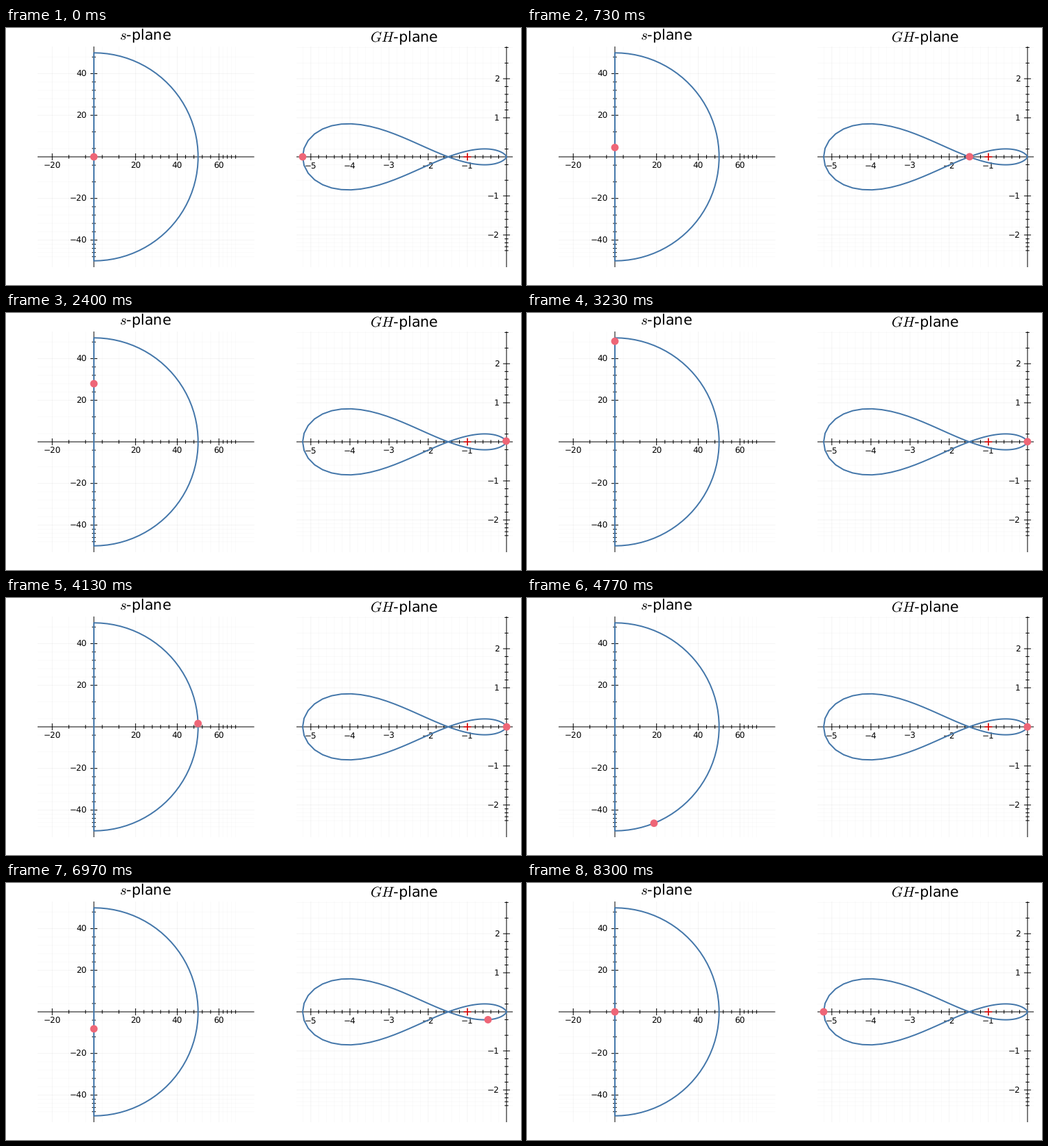
Recreate the animation shown at these times as a matplotlib script. Size 750x375 px, loop 8330 ms.

```python
import numpy as np
import matplotlib.pyplot as plt
from matplotlib.animation import FuncAnimation
from matplotlib.patches import Circle

W, H, DPI = 750, 375, 100
PX = 72 / DPI  # points per pixel
BLUE, PINK = "#4477AA", "#EE6677"
MAJOR, MINOR = 5, 2.75
TOP, BOTTOM = 27, 349
N = 50  # steps per leg of the contour
LOOP = 8330

plt.rcParams.update({
    "font.family": "DejaVu Sans",
    "mathtext.fontset": "cm",
    "path.simplify": False,
    "text.hinting": "none",
})

fig = plt.figure(figsize=(W / DPI, H / DPI), dpi=DPI, facecolor="white")
ax = fig.add_axes([0, 0, 1, 1])
ax.set_xlim(0, W)
ax.set_ylim(H, 0)
ax.axis("off")


def minor_ticks(ticks, lo, hi):
    """Split each interval in five, with one phantom tick on either side."""
    t = np.array(ticks, float)
    ratio = (t[2] - t[1]) / (t[1] - t[0])
    t = np.r_[t[0] - (t[1] - t[0]) / ratio, t, t[-1] + (t[-1] - t[-2]) * ratio]
    m = np.concatenate([np.linspace(a, b, 6)[1:-1] for a, b in zip(t, t[1:])])
    return m[(m >= lo) & (m <= hi)]


class Plane:
    def __init__(self, origin, unit, left, right, xticks, yticks):
        self.ox, self.oy = origin
        self.unit, self.left, self.right = unit, left, right
        self.xticks, self.yticks = xticks, yticks
        self.draw_axes()

    def px(self, z):
        return self.ox + np.real(z) * self.unit, self.oy - np.imag(z) * self.unit

    def draw_axes(self):
        ox, oy, u = self.ox, self.oy, self.unit
        xminor = minor_ticks(self.xticks, (self.left - ox) / u, (self.right - ox) / u)
        yminor = minor_ticks(self.yticks, (oy - BOTTOM) / u, (oy - TOP) / u)
        line = dict(colors="black", lw=PX, snap=False)
        for xs, ys, size, alpha in ((xminor, yminor, MINOR, 0.02),
                                    (self.xticks, self.yticks, MAJOR, 0.045)):
            xs = ox + np.array(xs) * u
            ys = oy - np.array(ys) * u
            ax.vlines(xs, TOP, BOTTOM, alpha=alpha, zorder=1, **line)
            ax.hlines(ys, self.left, self.right, alpha=alpha, zorder=1, **line)
            ax.vlines(xs, oy - size, oy + size, zorder=2, **line)
            ax.hlines(ys, ox - size, ox + size, zorder=2, **line)
        ax.hlines(oy, self.left, self.right, zorder=2, **line)
        ax.vlines(ox, TOP, BOTTOM, zorder=2, **line)
        for v in self.xticks:
            self.label(ox + v * u, oy + 17, v, "center")
        for v in self.yticks:
            self.label(ox - 10.3, oy - v * u + 4.2, v, "right")

    def label(self, x, y, value, ha):
        ax.text(x, y, str(value).replace("-", "\u2212"), ha=ha, va="baseline",
                fontsize=12 * PX, zorder=3)

    def title(self, text, y):
        ax.text((self.left + self.right) / 2 - 0.8, y, text, ha="center",
                va="baseline", fontsize=20.8 * PX, zorder=3)

    def trace(self, z):
        ax.plot(*self.px(z), color=BLUE, lw=2 * PX, zorder=4)
        self.path = z
        self.dot = ax.add_patch(Circle(self.px(z[0]), 5.45, fc=PINK, lw=0, zorder=6))

    def move(self, k):
        self.dot.center = self.px(self.path[k])


def loop_gain(s):
    return 500 / ((s - 2) * (s + 6) * (s + 8))


# Contour: slow and fast legs up the axis, half circle, and back.
slow = 1j * np.linspace(0, 10, N)
fast = 1j * np.linspace(10, 50, N)
arc = 50 * np.exp(1j * np.linspace(np.pi / 2, -np.pi / 2, N))
contour = np.concatenate([slow, fast, arc, -fast[::-1], -slow[::-1]])

s_plane = Plane((128, 188), 3.035, 46, 361.5, [-20, 20, 40, 60], [-40, -20, 20, 40])
s_plane.title("$s$-plane", 18)
s_plane.trace(contour)

gh_plane = Plane((728.9, 188), 57, 423, 738, [-5, -4, -3, -2, -1], [-2, -1, 1, 2])
gh_plane.title("$GH$-plane", 21)
gh_plane.trace(loop_gain(contour))

# Critical point
cx, cy = gh_plane.px(-1)
red = dict(colors="red", lw=1.3 * PX, snap=False, zorder=5)
ax.hlines(cy, cx - 5.5, cx + 5.5, **red)
ax.vlines(cx, cy - 5.5, cy + 5.5, **red)

FRAMES = 2 * len(contour)


def update(i):
    # Two ticks per step; each step is taken half a step early.
    k = (i + 1) // 2 % len(contour)
    s_plane.move(k)
    gh_plane.move(k)
    return s_plane.dot, gh_plane.dot


anim = FuncAnimation(fig, update, frames=FRAMES, interval=LOOP / FRAMES,
                     repeat=True, repeat_delay=0)
plt.show()
```
